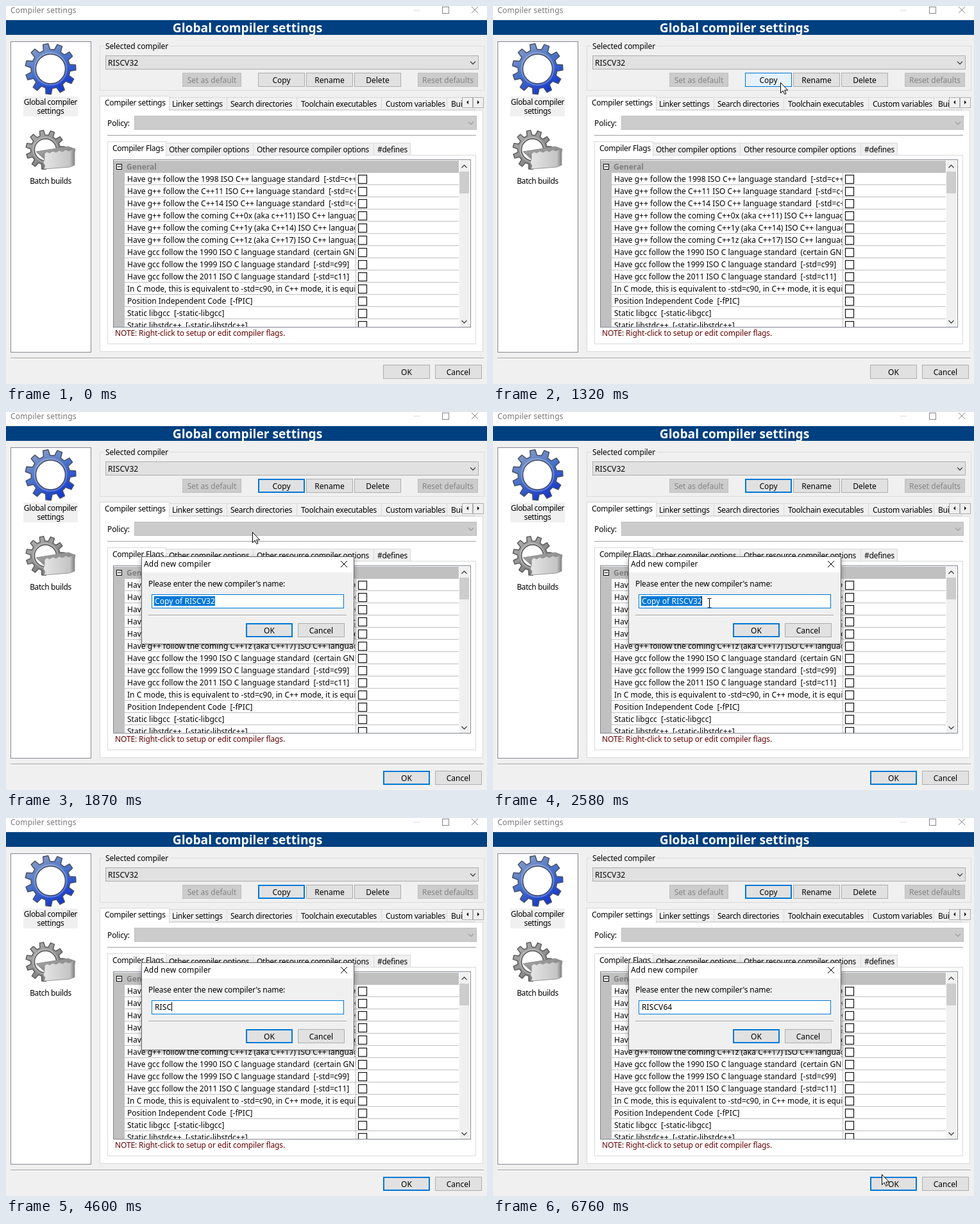
Animation, 750 px wide and 589 px high, one loop 6.85 s. Source, as an HTML page:

```html
<!DOCTYPE html>
<html lang="en">
<head>
<meta charset="utf-8">
<title>Compiler settings</title>
<style>
html, body { margin: 0; width: 750px; height: 589px; overflow: hidden; background: #f0f0f0; }
svg { display: block; }
text { font: 12px "Noto Sans", "Open Sans", sans-serif; white-space: pre; letter-spacing: .02px; }
.tab { letter-spacing: -.27px; }
.side { letter-spacing: -.38px; }
.label { letter-spacing: -.12px; }
.title { letter-spacing: .2px; }
.value { letter-spacing: .1px; }
.mid { text-anchor: middle; }
.head { font-size: 19.2px; font-weight: bold; letter-spacing: 0; }
.bold { font-weight: bold; }
</style>
</head>
<body>
<svg id="stage" width="750" height="589" viewBox="0 0 750 589"></svg>
<script>
const LOOP = 6850, BLUE = '#0078d7';

// x, y, w, h are outer pixel edges; the border lies inside them
const box = (x, y, w, h, fill, line, more = '') => line
  ? `<rect x="${x + .5}" y="${y + .5}" width="${w - 1}" height="${h - 1}" fill="${fill}" stroke="${line}" ${more}/>`
  : `<rect x="${x}" y="${y}" width="${w}" height="${h}" fill="${fill}" ${more}/>`;
const text = (x, y, s, cls = '', fill = '#000', more = '') =>
  `<text x="${x}" y="${y}" class="${cls}" fill="${fill}" ${more}>${s}</text>`;
const path = (d, line = '#000', fill = 'none', more = '') =>
  `<path d="${d}" stroke="${line}" fill="${fill}" ${more}/>`;
const cross = (x, y, line) => path(`M${x} ${y}l10 10m0-10l-10 10`, line);
const chevron = (x, y, line, dir = 1) => path(`M${x - 4} ${y - 2 * dir}l4 ${4 * dir}l4 ${-4 * dir}`, line, 'none', 'stroke-width="1.3"');

function button(x, y, w, label, id = '') {
  return `<g id="${id}">` + box(x, y, w, 22, '#e1e1e1', '#adadad') +
    box(x, y, w, 22, '#e5f1fb', BLUE, 'class="hover" opacity="0"') +
    box(x, y, w, 22, '#cce4f7', '#005499', 'class="press" opacity="0"') +
    `<rect class="focus" x="${x + 1}" y="${y + 1}" width="${w - 2}" height="20" fill="none" stroke="${BLUE}" stroke-width="2" opacity="0"/>` +
    text(x + w / 2, y + 16, label, 'mid') + '</g>';
}
const disabled = (x, y, w, label) =>
  box(x, y, w, 22, '#ccc', '#bfbfbf') + text(x + w / 2, y + 16, label, 'mid', '#838383');

// Tab strip: edges holds the left side of each tab and the final right side
function tabs(y, edges, labels, inset) {
  return labels.map((s, i) => {
    const x = edges[i], w = edges[i + 1] - x + 1;
    return i
      ? box(x, y + 2, w, 20, '#f0f0f0', '#d9d9d9') + text(inset[i], y + 17, s, 'tab')
      : box(x, y, w, 24, '#fff', '#d9d9d9') + box(x + 1, y + 21, w - 2, 4, '#fff') + text(inset[i], y + 15, s, 'tab');
  }).reverse().join('');
}

function gear(cx, cy, outer, root, hole, teeth, fill, line) {
  const at = (r, a) => `${(cx + r * Math.cos(a)).toFixed(2)} ${(cy + r * Math.sin(a)).toFixed(2)}`;
  const step = 2 * Math.PI / teeth, pts = [];
  for (let i = 0; i < teeth; i++) {
    const a = i * step - 1.77;
    pts.push(at(root, a - step * .3), at(outer, a - step * .18), at(outer, a + step * .18), at(root, a + step * .3));
  }
  const ring = r => `<circle cx="${cx}" cy="${cy}" r="${r}" `;
  return path('M' + pts.join('L') + 'Z', line, fill, 'stroke-width="1.5" stroke-linejoin="round"') +
    ring(hole + 2) + `fill="none" stroke="#fff" stroke-opacity=".25" stroke-width="2"/>` +
    ring(hole) + `fill="#fff" stroke="${line}" stroke-width="1.5"/>`;
}

const flags = [
  'Have g++ follow the 1998 ISO C++ language standard  [-std=c++98]',
  'Have g++ follow the C++11 ISO C++ language standard  [-std=c++11]',
  'Have g++ follow the C++14 ISO C++ language standard  [-std=c++14]',
  'Have g++ follow the coming C++0x (aka c++11) ISO C++ language standard',
  'Have g++ follow the coming C++1y (aka C++14) ISO C++ language standard',
  'Have g++ follow the coming C++1z (aka C++17) ISO C++ language standard',
  'Have gcc follow the 1990 ISO C language standard  (certain GNU extensions)',
  'Have gcc follow the 1999 ISO C language standard  [-std=c99]',
  'Have gcc follow the 2011 ISO C language standard  [-std=c11]',
  'In C mode, this is equivalent to -std=c90, in C++ mode, it is equivalent',
  'Position Independent Code  [-fPIC]',
  'Static libgcc  [-static-libgcc]',
  'Static libstdc++  [-static-libstdc++]'
];

const defs = `<defs>
  <linearGradient id="blue" x1=".2" y1="0" x2=".75" y2="1"><stop offset="0" stop-color="#8c9fc6"/><stop offset=".45" stop-color="#4a72c8"/><stop offset="1" stop-color="#0c2fd0"/></linearGradient>
  <linearGradient id="grey" x1="0" y1="0" x2=".8" y2="1"><stop offset="0" stop-color="#b4b4b4"/><stop offset="1" stop-color="#707070"/></linearGradient>
  <linearGradient id="paper"><stop offset="0" stop-color="#e6e6e6"/><stop offset=".85" stop-color="#c4c4c4"/><stop offset="1" stop-color="#808080"/></linearGradient>
  <clipPath id="names"><path d="M168 240H544.5V501H168Z"/></clipPath>
  <clipPath id="rows"><path d="M168 240H724V500H168Z"/></clipPath>
  <filter id="shade" x="-10%" y="-10%" width="120%" height="130%"><feDropShadow dx="0" dy="3" stdDeviation="4" flood-opacity=".35"/></filter>
</defs>`;

const frame = box(0, 0, 750, 589, '#f0f0f0') + box(0, 0, 750, 22, '#fff') +
  text(7, 11, 'Compiler settings', 'title', '#777') +
  path('M635 6.5h10', '#ddd') + box(680, 1, 11, 11, 'none', '#888') + cross(726, 1, '#888') +
  box(0, 22, 750, 23, '#004080') + text(376.5, 41, 'Global compiler settings', 'head mid', '#fff') +
  path('M7 548.5H745', '#a0a0a0') + path('M7 549.5H745', '#fff') +
  button(588, 559, 73, 'OK', 'ok') + button(669, 559, 73, 'Cancel');

const sidebar = box(7, 55, 126, 485, '#fff', '#828790') +
  gear(69.5, 98, 39.5, 30.5, 23, 11, 'url(#blue)', '#465066') +
  box(27, 141, 85, 31, '#f0f0f0') +
  text(69.5, 154, 'Global compiler', 'side mid') + text(69.5, 168, 'settings', 'side mid') +
  gear(61.5, 224, 30.5, 23, 17, 11, 'url(#grey)', '#5c5c5c') +
  path('M47 227L97 219L108 223L106 232L60 239Z', '#888', 'url(#grey)') +
  path('M60 230l4-3l4 2l5-3l5 2l5-3l5 2l5-3l5 2l9-4v26l-8 3l-40 3l2-5l-3-5l2-5Z', '#999', 'url(#paper)') +
  text(69.5, 277, 'Batch builds', 'side mid');

const chooser = box(146, 62, 600, 70, 'none', '#dcdcdc') + box(152, 60, 103, 5, '#f0f0f0') +
  text(155, 67, 'Selected compiler', 'label') +
  box(155, 77, 582, 22, '#e1e1e1', '#adadad') + text(159, 93, 'RISCV32', 'value') + chevron(728, 88.5, '#444') +
  disabled(275, 104, 92, 'Set as default') + button(393, 104, 73, 'Copy', 'copy') +
  button(468, 104, 73, 'Rename', 'rename') + button(543, 104, 73, 'Delete', 'delete') +
  disabled(642, 104, 94, 'Reset defaults');

const pages = box(146, 162, 598, 377, '#fff', '#d9d9d9') +
  tabs(140, [146, 254, 344, 453, 585, 687, 730],
    ['Compiler settings', 'Linker settings', 'Search directories', 'Toolchain executables', 'Custom variables', 'Buil'],
    [154, 259, 350, 460, 592, 694]) +
  box(711, 142, 17, 17, '#f0f0f0', '#adadad') + box(728, 142, 17, 17, '#f0f0f0', '#adadad') +
  path('M721 147v6l-3-3ZM735 147v6l3-3Z', 'none', '#000') +
  text(158, 187, 'Policy:', 'label') + box(200, 171, 534, 22, '#ccc', '#bfbfbf') + chevron(725, 182.5, '#a0a0a0') +
  path('M158 201.5H733', '#a0a0a0') +
  box(158, 232, 575, 295, '#fff', '#d9d9d9') +
  tabs(211, [158, 249, 385, 573, 630],
    ['Compiler Flags', 'Other compiler options', 'Other resource compiler options', '#defines'],
    [166, 254, 391, 579]) +
  text(170, 514, 'NOTE: Right-click to setup or edit compiler flags.', 'label', '#640000');

const row = (s, i) => {
  const y = 260 + 19 * i;
  return path(`M185 ${y + 18.5}H706`, '#c0c0c0') + text(189, y + 14, s, '', '#000', 'clip-path="url(#names)"') +
    box(549, y + 3, 14, 14, '#fff', '#111', 'stroke-width="1.2"');
};
const grid = box(167, 239, 558, 262, '#fff', '#828790') + '<g clip-path="url(#rows)">' +
  box(168, 241, 17, 260, '#c0c0c0') + box(168, 241, 538, 19, '#c0c0c0') +
  box(172, 246, 9, 9, '#fff', '#000') + path('M174 250.5h5') +
  text(188, 255, 'General', 'bold', '#808080') + flags.map(row).join('') +
  path('M545.5 260V501', '#c0c0c0') + '</g>' +
  box(707, 241, 16, 259, '#f0f0f0') + box(707, 258, 15, 34, '#cdcdcd') +
  chevron(714.5, 250, '#444', -1) + chevron(714.5, 492, '#444');

const dialog = '<g id="dialog"><g filter="url(#shade)">' + box(211, 225, 332, 137, '#f0f0f0', '#666') + '</g>' +
  box(212, 226, 330, 24, '#fff') + text(215, 241, 'Add new compiler', 'title') + cross(522, 232, '#000') +
  text(222, 272, "Please enter the new compiler's name:", 'label') +
  box(227, 284, 300, 22, '#fff', BLUE) + box(231, 287, 95, 15, BLUE, '', 'id="mark"') +
  text(232, 299, '', 'value', '#000', 'id="entry"') + box(0, 287, 1, 14, '#000', '', 'id="caret"') +
  path('M222 316.5H531', '#a0a0a0') + path('M222 317.5H531', '#fff') +
  button(374, 329, 73, 'OK', 'accept') + button(455, 329, 73, 'Cancel') + '</g>';

const pointers = path('M.5 .5V16.5L4.2 13.1L6.7 18.5L9 17.5L6.6 12.2H11.6Z', '#000', '#fff', 'id="arrow"') +
  path('M-3 -7.5h2.5l.5 .5l.5-.5H3M0 -7V6.5M-3 7h2.5l.5-.5l.5 .5H3', '#000', 'none', 'id="beam"');

stage.innerHTML = defs + frame + sidebar + chooser + pages + grid + dialog + pointers;

const $ = s => document.querySelector(s);
const show = (s, v) => $(s).setAttribute('opacity', +v);
const ramp = (t, a, b) => Math.min(1, Math.max(0, (t - a) / (b - a)));
show('#accept .focus', 1);

// Pointer route: time, x, y
const route = [
  [150, 710, 556], [470, 575, 190], [620, 525, 121], [700, 490, 118], [780, 453, 122],
  [850, 453, 122], [1000, 448, 119], [1720, 448, 119], [1870, 384, 187],
  [2095, 313, 297], [2250, 313, 297], [2570, 337, 298]
];
function pointer(t) {
  if (t >= 6760) return [606, 555];
  if (t >= 6690) return [545, 440];
  if (t < 150 || t >= 3750) return null;
  const q = 150 + Math.floor((t - 140) / 78.2) * 78.2;
  const i = route.findIndex(k => k[0] > q);
  if (i < 0) return route.at(-1).slice(1);
  const a = route[Math.max(0, i - 1)], b = route[i], p = ramp(q, a[0], b[0]);
  return [1, 2].map(n => Math.round(a[n] + (b[n] - a[n]) * p));
}

const keyTimes = [3750, 4060, 4290, 4600, 5370, 5920, 6070];

function draw(t) {
  show('#delete .hover', ramp(t, 540, 580) * (1 - ramp(t, 620, 780)));
  show('#rename .hover', ramp(t, 620, 700) * (1 - ramp(t, 850, 1200)));
  show('#copy .hover', t < 1480 && ramp(t, 840, 1250));
  show('#copy .press', t >= 1480 && t < 1620);
  show('#copy .focus', t >= 1620);
  show('#ok .focus', t >= 1480);

  const p = ramp(t, 1650, 1800), k = .96 + .04 * p;
  show('#dialog', p);
  $('#dialog').setAttribute('transform', `translate(377 293.5) scale(${k}) translate(-377 -293.5)`);

  const typed = keyTimes.filter(k => k <= t).length;
  const entry = $('#entry');
  entry.textContent = typed ? 'RISCV64'.slice(0, typed) : 'Copy of RISCV32';
  entry.setAttribute('fill', typed ? '#000' : '#fff');
  show('#mark', !typed);
  const since = typed ? t - keyTimes[typed - 1] : t - 2580;
  show('#caret', since >= 0 && since % 1090 < 540);
  $('#caret').setAttribute('x', typed ? Math.round(232 + entry.getComputedTextLength()) : 325);

  const at = pointer(t), inField = at && t > 1900 && t < 3750 && at[1] > 284;
  show('#arrow', at && !inField);
  show('#beam', inField);
  if (at) $(inField ? '#beam' : '#arrow').setAttribute('transform', `translate(${at[0] + (inField ? .5 : 0)} ${at[1]})`);
}

const start = performance.now();
function tick() {
  draw((performance.now() - start) % LOOP);
  requestAnimationFrame(tick);
}
tick();
</script>
</body>
</html>
```
